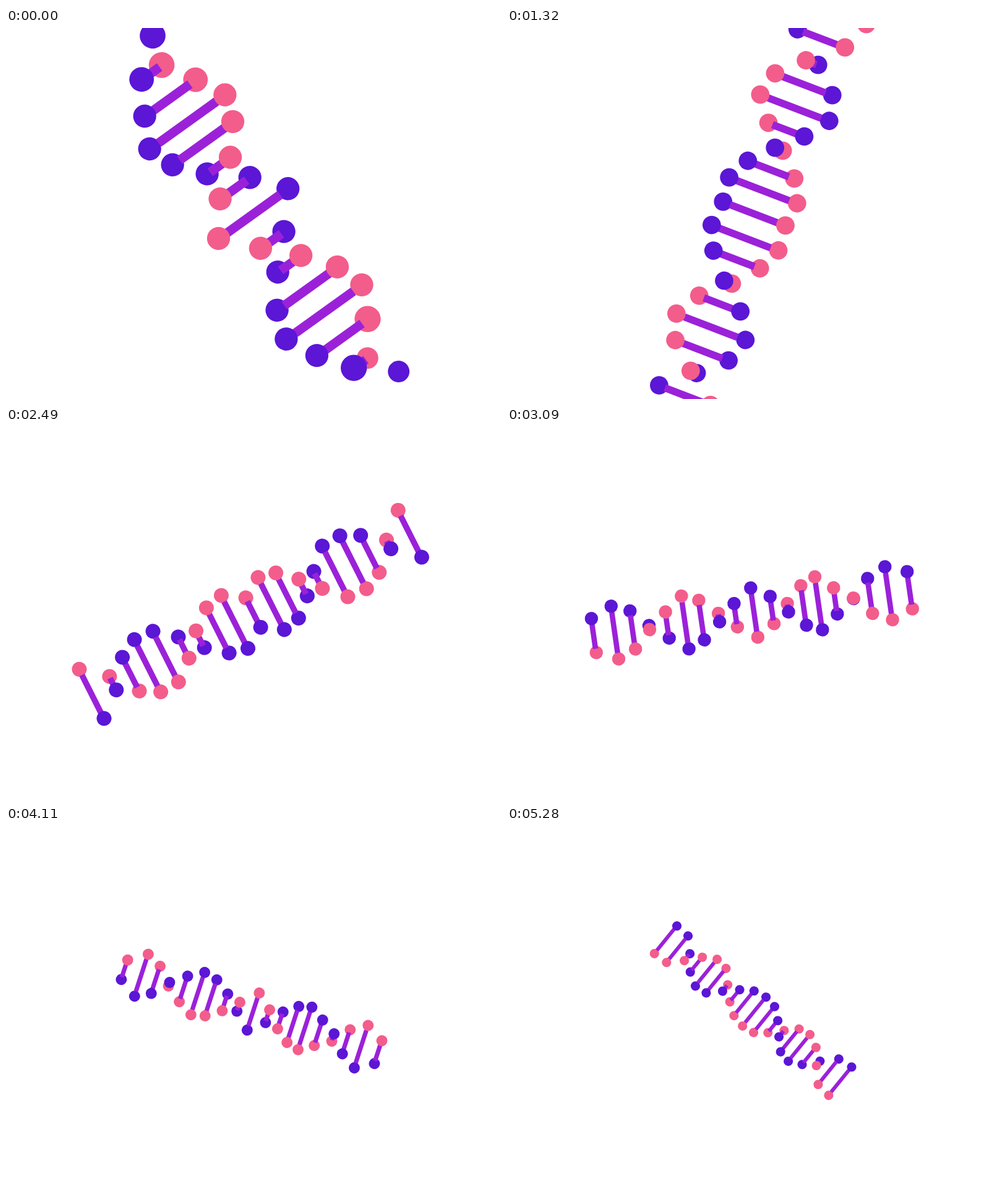
An HTML page with a canvas for the animation above (5.31 s loop, 800 by 600 pixels).

```html
<!DOCTYPE html>
<html lang="en">
<head>
<meta charset="utf-8">
<title>DNA helix</title>
<style>
html, body { margin: 0; width: 100%; height: 100%; overflow: hidden; background: #fff; }
canvas { display: block; }
</style>
</head>
<body>
<canvas id="stage" width="800" height="600"></canvas>
<script>
const ctx = document.getElementById('stage').getContext('2d');
const LOOP = 5310, STEP = 30, RAD = Math.PI / 180;
const BLUE = '#5b16d6', PINK = '#f35d8b', BAR = '#9b21d9';
const REACH = 65.4, BALL = 16.25;
const THICK = 13, BAR_SHIFT = 0.6, BAR_RATIO = 0.77;

// Place along the axis and twist in degrees for each rung
const PLACE = [-384, -332, -286, -245, -200.5, -159, -122, -83.2, -44, 0,
  45.7, 87, 130, 170.5, 214.5, 259, 300, 344, 396];
const TWIST = [386, 337, 282.5, 239.5, 211.5, 154.5, 118, 81, 40.5, 0,
  45.5, 81, 118, 159.5, 211.5, 244.5, 287.5, 342, 391];
const MID = 9;

// Staggered entrance, from the middle rung outwards
const POP_TIME = 0.45, POP_GAP = 0.18, POP_LAG = 0.06;

function pop(stage, lag, t) {
  const x = (t - (stage - 8) * POP_GAP - lag) / POP_TIME;
  if (x <= 0) return 0;
  if (x >= 1) return 1;
  const y = x - 1;
  return 1 + 3.3 * y ** 3 + 2.3 * y * y;
}

function turned(t) {
  return 46.13 * t - 2.325 * t * t - 0.0952 * t ** 3;
}

function spin(t) {
  const late = Math.max(0, t - 4);
  return 21 - 173.8 * t - 8 * late * late;
}

function ball(x, y, size, color) {
  if (size <= 0) return;
  ctx.fillStyle = color;
  ctx.beginPath();
  ctx.arc(x, y, BALL * size, 0, Math.PI * 2);
  ctx.fill();
}

function rung(i, t) {
  const y = PLACE[i], ring = Math.abs(i - MID);
  const lag = i > MID ? POP_LAG : 0;
  const blueSize = pop(ring, lag, t), pinkSize = pop(ring + 1, lag, t);
  const base = (spin(t) + TWIST[i]) * RAD;
  const phase = base + 6 * RAD * Math.sin(base);
  const x = REACH * Math.cos(phase);
  const drawBlue = () => ball(x, y, blueSize, BLUE);
  const drawPink = () => ball(-x, y, pinkSize, PINK);
  const blueFront = Math.sin(phase) < 0;

  // The bar lies over the far ball and under the near one
  (blueFront ? drawPink : drawBlue)();
  const half = Math.abs(x) * BAR_RATIO * Math.min(1, pinkSize);
  ctx.fillStyle = BAR;
  ctx.fillRect(-half, y + BAR_SHIFT - THICK / 2, half * 2, THICK);
  (blueFront ? drawBlue : drawPink)();
}

function draw(t) {
  const turn = turned(t);
  const zoom = (896 - 3.235 * turn) / 780;
  ctx.setTransform(1, 0, 0, 1, 0, 0);
  ctx.fillStyle = '#fff';
  ctx.fillRect(0, 0, 800, 600);
  ctx.translate(399.6, 300.1);
  ctx.rotate((turn - 35.7) * RAD);
  ctx.scale(zoom, zoom);
  for (let i = 0; i < PLACE.length; i++) rung(i, t);
}

const start = performance.now();
function tick() {
  const ms = (performance.now() - start) % LOOP;
  draw(Math.floor(ms / STEP) * STEP / 1000);
  requestAnimationFrame(tick);
}
tick();
</script>
</body>
</html>
```
